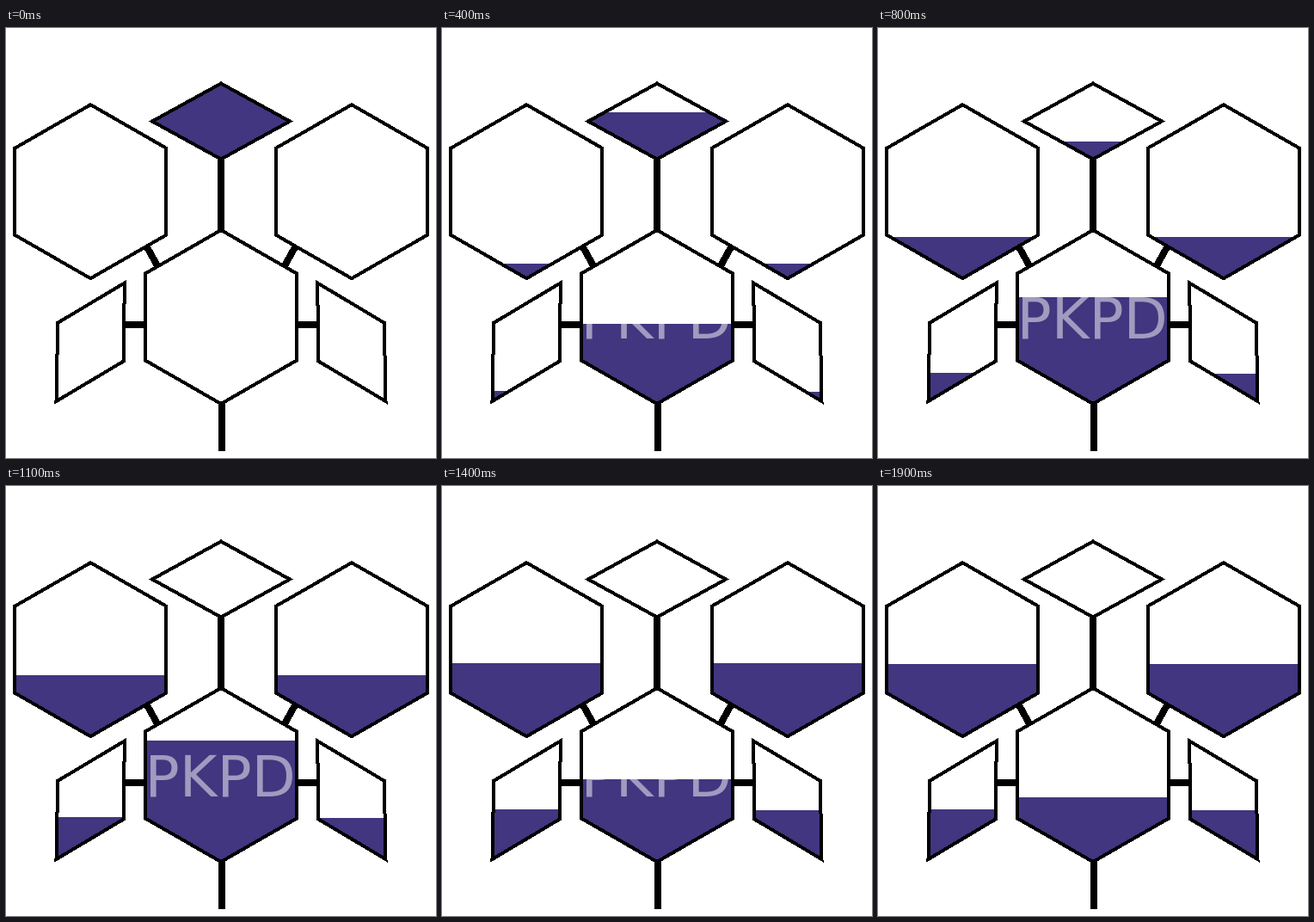
Write an HTML page that moves like this. It is 500 px wide and 500 px high and loops after 2 s.

```html
<!DOCTYPE html>
<html lang="en">
<head>
<meta charset="utf-8">
<title>Filling vessels</title>
<style>
  html, body { margin: 0; width: 100%; height: 100%; overflow: hidden; background: #fff; }
  svg { display: block; width: 100%; height: 100%; }
  .outline, .links { fill: none; stroke: #000; shape-rendering: crispEdges; }
  .outline { stroke-width: 4; stroke-miterlimit: 10; }
  .links { stroke-width: 8; }
  .liquid { fill: #41367f; }
  text { font: 50pt "DejaVu Sans", sans-serif; fill: #fff; fill-opacity: .5; }
</style>
</head>
<body>
<svg viewBox="0 0 500 500">
  <path class="links" d="M250 152V236M251 436V492M137 345H162M338 345H363M163.5 254L176 276.5M336.5 254L324 276.5"/>
  <g id="vessels"></g>
  <text x="161.5" y="361">PKPD</text>
  <g id="outlines"></g>
</svg>
<script>
const STEP = 100, STEPS = 20, PEAK = 11;
const NS = "http://www.w3.org/2000/svg";

// Surface height (y) of each liquid at a given step.
const sourceLevel = step => 64 + 8.5 * step;
const sideLevel = step => Math.max(305 - 7.72 * step, 205.2 + 0.07 * step);
const leafLevel = step => Math.max(443.6 - 5.35 * step, 376);
const centreLevel = step => step <= PEAK
  ? 436 - 92.4 * (step / 4) ** 0.413
  : 296 + 70.6 * (1 - Math.exp(-0.337 * (step - PEAK)));

const diamond = (x, y, rx, ry) => [[x, y - ry], [x + rx, y], [x, y + ry], [x - rx, y]];
const hexagon = (x, y) => [
  [x, y - 101], [x + 88, y - 50.5], [x + 88, y + 50.5],
  [x, y + 101], [x - 88, y + 50.5], [x - 88, y - 50.5]
];
const mirror = points => points.map(([x, y]) => [500 - x, y]);
const leaf = [[137.8, 296.5], [136.7, 387.5], [58.5, 434], [60.2, 342.8]];

const vessels = [
  { points: diamond(250, 108.5, 80, 44), level: sourceLevel },
  { points: hexagon(98.3, 190.2), level: sideLevel },
  { points: hexagon(401.9, 190.2), level: sideLevel },
  { points: hexagon(250, 336), level: centreLevel },
  { points: leaf, level: leafLevel },
  { points: mirror(leaf), level: step => leafLevel(step) + 1 }
];

const add = (parent, tag, attrs) => {
  const node = parent.appendChild(document.createElementNS(NS, tag));
  for (const key in attrs) node.setAttribute(key, attrs[key]);
  return node;
};

const group = document.getElementById("vessels");
const outlines = document.getElementById("outlines");
vessels.forEach((vessel, i) => {
  const points = vessel.points.join(" ");
  const clip = add(group, "clipPath", { id: "vessel" + i });
  add(clip, "polygon", { points });
  add(group, "polygon", { points, fill: "#fff" });
  const holder = add(group, "g", { "clip-path": `url(#vessel${i})` });
  vessel.liquid = add(holder, "rect", { class: "liquid", width: 500, height: 500 });
  add(outlines, "polygon", { points, class: "outline" });
});

const start = performance.now();
function draw(now) {
  const step = Math.floor(Math.max(0, now - start) / STEP) % STEPS;
  for (const { liquid, level } of vessels) liquid.setAttribute("y", Math.round(level(step)));
  requestAnimationFrame(draw);
}
draw(start);
</script>
</body>
</html>
```
